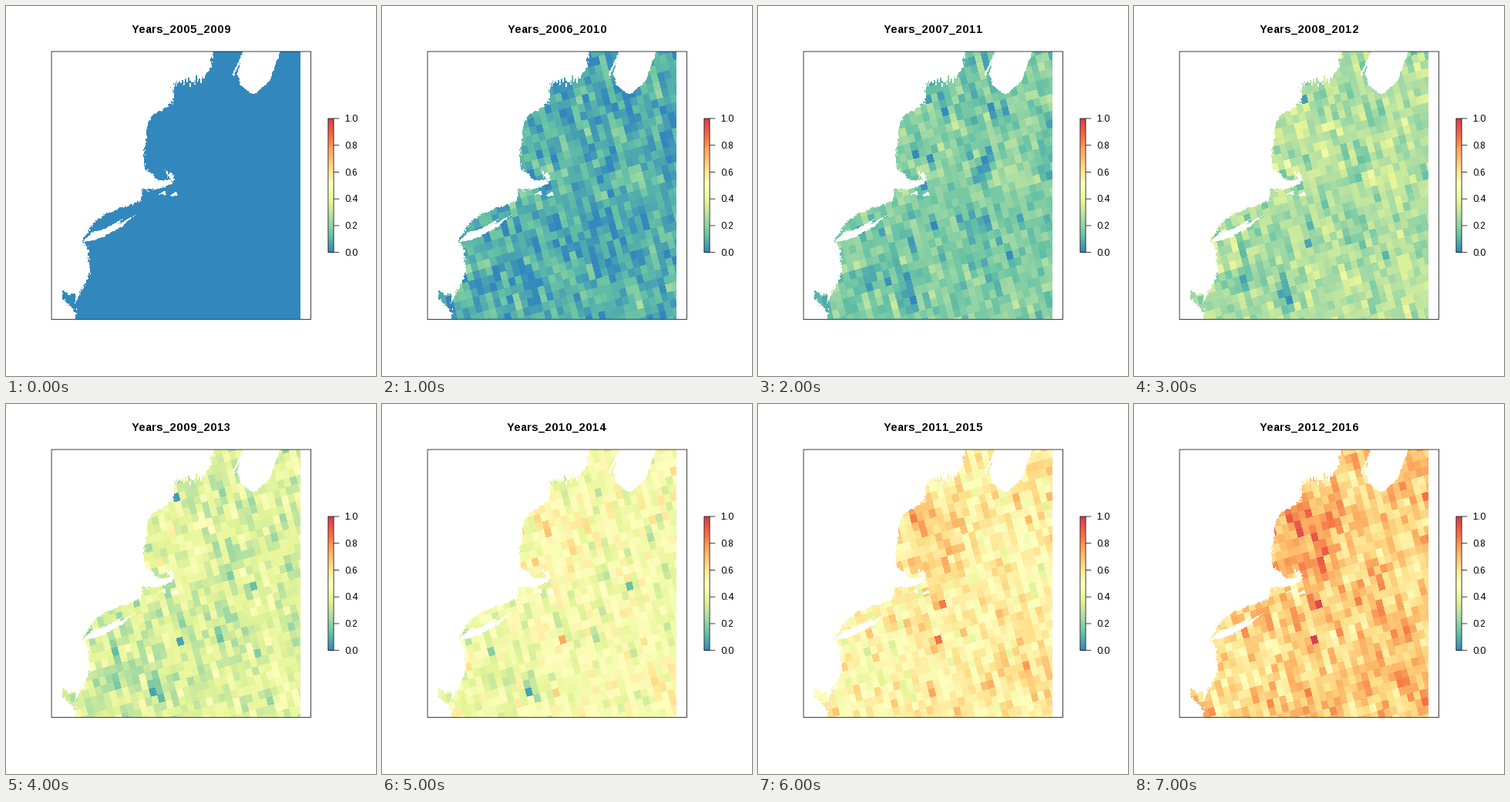
These frames come from a looping animation (480 by 480 pixels, 8 s). A matplotlib script:

```python
import numpy as np
import matplotlib.pyplot as plt
from matplotlib.animation import FuncAnimation
from matplotlib.colors import LinearSegmentedColormap
from matplotlib.patches import Rectangle
from matplotlib.path import Path

SIZE, DPI, FRAMES = 480, 100, 8
PX = 72 / DPI
LINE = 0.75 * PX
plt.rcParams.update({"font.family": "Liberation Sans",
                     "text.hinting_factor": 1})

# Page layout: margins counted in text lines
TEXT_LINE = 14.4
LEFT = TOP = 4.1 * TEXT_LINE
BOTTOM = SIZE - 5.1 * TEXT_LINE
RIGHT = 395.5
SEA_LEFT, SEA_RIGHT = 73, 382
BAR_LEFT, BAR_RIGHT = 417.9, 425.1
BAR_HEIGHT = (BOTTOM - TOP) / 2
BAR_TOP = TOP + BAR_HEIGHT / 2

cmap = LinearSegmentedColormap.from_list("spectral9", [
    "#3288BD", "#66C2A5", "#ABDDA4", "#E6F598", "#FFFFBF",
    "#FEE08B", "#FDAE61", "#F46D43", "#D53E4F"])
rng = np.random.default_rng(12)

# Key points of the shoreline; noise adds the fine detail
MAINLAND = [(50, 50), (271, 50), (264, 86), (241, 98), (217, 101), (217, 126),
            (190, 142), (182, 160), (179, 209), (198, 226), (214, 225),
            (206, 213), (217, 219), (218, 228), (198, 239), (176, 238),
            (175, 253), (134, 268), (118, 276), (98, 305), (108, 315),
            (108, 348), (91, 384), (91, 410), (50, 410)]
BAY = [(73, 369), (81, 374), (90, 373), (89, 384), (92, 402), (85, 391),
       (73, 380)]
ISLANDS = [
    [(99, 306), (112, 293), (128, 289), (151, 276), (146, 283), (168, 271),
     (146, 289), (118, 303)],
    [(309, 50), (300, 88), (304, 103), (322, 115), (342, 97), (355, 62),
     (355, 50)],
    [(309, 62), (295, 91), (293, 90), (305, 64)],
    [(198, 244), (206, 240), (208, 245)],
    [(213, 246), (220, 241), (223, 246)]]

yy, xx = np.mgrid[0:SIZE, 0:SIZE] + 0.5


def blocky(w, h):
    n = rng.normal(size=(SIZE // h + 1, SIZE // w + 1))
    return np.kron(n, np.ones((h, w)))[:SIZE, :SIZE]


def inside(poly, x, y):
    pts = np.column_stack([x.ravel(), y.ravel()])
    return Path(poly).contains_points(pts).reshape(x.shape)


def sea_mask():
    ragged = np.exp(-((xx - 235) / 35) ** 2 - ((yy - 100) / 30) ** 2)
    fine_x = xx + 0.6 * blocky(1, 2) + 0.7 * blocky(3, 4)
    fine_y = yy + 0.6 * blocky(2, 1) + 0.7 * blocky(4, 3)
    gx = fine_x + 1.5 * ragged * blocky(1, 3)
    gy = fine_y + 3.5 * ragged * blocky(2, 10)
    land = inside(MAINLAND, gx, gy) & ~inside(BAY, fine_x, fine_y)
    soft_x, soft_y = (xx + fine_x) / 2, (yy + fine_y) / 2
    for isle in ISLANDS:
        land |= inside(isle, soft_x, soft_y)
    return (~land & (xx > SEA_LEFT) & (xx < SEA_RIGHT)
            & (yy > TOP) & (yy < BOTTOM - 0.5))


# Slanted lattice of survey cells
ORIGIN = np.array([226.0, 308.0])
BASIS = np.array([[8.15, 2.7], [-2.35, 10.3]])
INV = np.linalg.inv(BASIS)
HALF = 60
rows, cols = np.mgrid[-HALF:HALF + 1, -HALF:HALF + 1]
cx = ORIGIN[0] + BASIS[0, 0] * cols + BASIS[0, 1] * rows
cy = ORIGIN[1] + BASIS[1, 0] * cols + BASIS[1, 1] * rows


def cell_of(x, y):
    dx, dy = x - ORIGIN[0], y - ORIGIN[1]
    col = np.rint(INV[0, 0] * dx + INV[0, 1] * dy).astype(int)
    row = np.rint(INV[1, 0] * dx + INV[1, 1] * dy).astype(int)
    return (np.clip(row + HALF, 0, 2 * HALF),
            np.clip(col + HALF, 0, 2 * HALF))


# Broad trends: x, y, x radius, y radius, early strength, late strength
TRENDS = [(225, 165, 40, 60, 0.00, 0.12), (285, 285, 20, 45, -0.08, -0.05),
          (130, 350, 60, 60, -0.02, -0.09), (360, 350, 25, 50, 0.00, 0.09),
          (350, 210, 25, 60, 0.00, -0.08), (195, 375, 10, 20, -0.15, -0.06)]

# Standout cells: x, y, first and last year, value
SPOTS = [(222, 117, 2, 4, 0.05), (192, 373, 2, 5, 0.06),
         (226, 308, 3, 4, 0.06), (323, 234, 4, 5, 0.13),
         (234, 305, 5, 7, 0.75), (238, 259, 6, 7, 0.85)]


def cell_values():
    out, drift = [], np.zeros(cx.shape)
    for k in range(FRAMES):
        step = rng.normal(size=cx.shape)
        drift = 0.8 * drift + step + 0.55 * np.roll(step, 1, axis=0)
        noise = drift / drift.std()
        v = 0.082 * k + 0.002 * k * k + min(k, 1) * (0.048 + 0.004 * k) * noise
        late = np.clip((k - 2) / 5, 0, 1)
        for x, y, rx, ry, a, b in TRENDS:
            dy = cy - y
            dx = cx - x - 0.26 * dy
            bump = np.exp(-(dx / rx) ** 2 - (dy / ry) ** 2)
            v += min(1, k / 3) * (a + (b - a) * late) * bump
        for x, y, first, last, value in SPOTS:
            if first <= k <= last:
                grow = 0.12 * (k - first) if value > 0.5 else 0
                v[cell_of(x, y)] = value + grow
        out.append(np.clip(v, 0, 1))
    return out


def draw_pictures():
    base = np.ones((SIZE, SIZE, 3))
    base[146:320, 418:425] = cmap(np.linspace(1, 0, 174))[:, None, :3]
    sea, cells = sea_mask(), cell_of(xx, yy)
    pictures = []
    for grid in cell_values():
        pic = base.copy()
        pic[sea] = cmap(grid[cells][sea])[:, :3]
        pictures.append(pic)
    return pictures


def outline(x0, y0, x1, y1):
    ax.add_patch(Rectangle((x0, y0), x1 - x0, y1 - y0, fill=False,
                           ec="black", lw=LINE, snap=False))


pictures = draw_pictures()
fig = plt.figure(figsize=(SIZE / DPI, SIZE / DPI), dpi=DPI, facecolor="white")
ax = fig.add_axes([0, 0, 1, 1])
ax.axis("off")
view = ax.imshow(pictures[0], extent=(0, SIZE, SIZE, 0),
                 interpolation="nearest", aspect="auto")
ax.set_autoscale_on(False)
outline(LEFT, TOP, RIGHT, BOTTOM)
outline(BAR_LEFT, BAR_TOP, BAR_RIGHT, BAR_TOP + BAR_HEIGHT)
title = ax.text((LEFT + RIGHT) / 2, 35, "", size=14.4 * PX, weight="bold",
                ha="center", va="baseline")
for i in range(6):
    y = BAR_TOP + BAR_HEIGHT * (1 - i / 5)
    ax.plot([BAR_RIGHT, BAR_RIGHT + TEXT_LINE / 2], [y, y], color="black",
            lw=LINE, snap=False, solid_capstyle="butt")
    ax.text(BAR_RIGHT + TEXT_LINE, y + 4.3, f"{i / 5:.1f}", size=12 * PX,
            ha="left", va="baseline")


def update(k):
    view.set_data(pictures[k])
    title.set_text(f"Years_{2005 + k}_{2009 + k}")
    return view, title


anim = FuncAnimation(fig, update, frames=FRAMES, interval=1000, repeat=True,
                     repeat_delay=0, blit=False)
plt.show()
```
